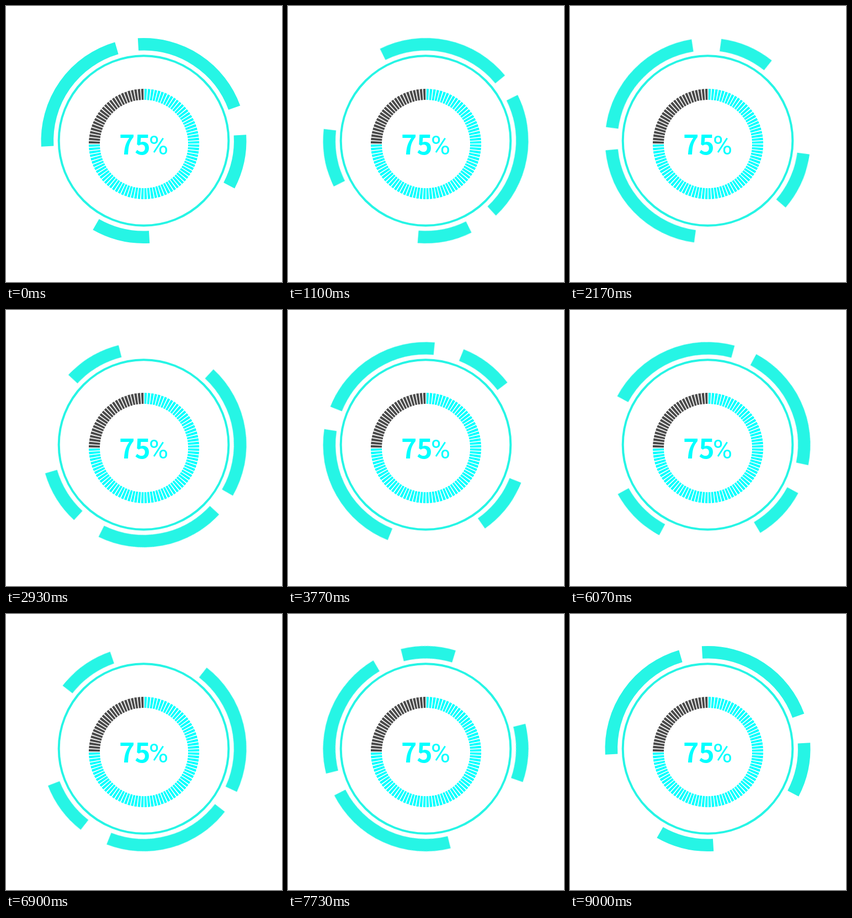
An HTML page for the animation above (9.03 s loop, 500 by 500 pixels).

```html
<!DOCTYPE html>
<html lang="en">
<head>
<meta charset="utf-8">
<title>Progress dial</title>
<style>
  html, body { margin: 0; width: 100%; height: 100%; overflow: hidden; background: #fff; }
  svg { display: block; width: 100vw; height: 100vh; }
  circle, path { fill: none; }
  .frame { stroke: #26f5e5; }
  .ticks { stroke-width: 20; stroke-dasharray: .7 .3; stroke-dashoffset: -.15; }
  .value { fill: #0ff; font: 700 48px "Noto Sans CJK SC", "Noto Sans CJK JP", "Noto Sans CJK", "Noto Sans", sans-serif; }
  .unit { font: 400 48px Roboto, Lato, sans-serif; }

  /* Paused: the script picks the moment so the motion keeps its 30 fps steps. */
  #ring {
    transform-origin: 249.5px 244px;
    animation: turn 9s infinite paused;
  }
  @keyframes turn {
    0% { transform: rotate(0deg); animation-timing-function: cubic-bezier(.521, 0, .683, 1); }
    45.556% { transform: rotate(670deg); animation-timing-function: cubic-bezier(.587, 0, .691, 1); }
    100% { transform: rotate(1080deg); }
  }
</style>
</head>
<body>
<svg viewBox="0 0 500 500">
  <g id="ring" class="frame" stroke-width="22.6"></g>
  <circle class="frame" cx="249.5" cy="244" r="153.8" stroke-width="4"/>
  <g id="dial"></g>
  <text class="value" x="205" y="268.5">75<tspan class="unit" x="258.8">%</tspan></text>
</svg>
<script>
  const LOOP = 9030;
  const ring = document.getElementById('ring');
  const dial = document.getElementById('dial');

  // Angles run clockwise from twelve o'clock.
  function addArc(parent, cx, cy, r, from, sweep, attrs = {}) {
    const point = deg => {
      const a = deg * Math.PI / 180;
      return `${cx + r * Math.sin(a)} ${cy - r * Math.cos(a)}`;
    };
    const path = document.createElementNS('http://www.w3.org/2000/svg', 'path');
    const large = sweep > 180 ? 1 : 0;
    path.setAttribute('d', `M${point(from)}A${r} ${r} 0 ${large} 1 ${point(from + sweep)}`);
    for (const key in attrs) path.setAttribute(key, attrs[key]);
    parent.append(path);
  }

  [73.3, 31, 33, 77].forEach((sweep, i) =>
    addArc(ring, 249.5, 244, 174.7, -3.3 + 90 * i, sweep));

  addArc(dial, 250, 250, 90, 0, 270, { class: 'ticks', stroke: '#0ff', pathLength: 75 });
  addArc(dial, 250, 250, 90, 270, 90, { class: 'ticks', stroke: '#4a4a4a', pathLength: 25 });

  function draw() {
    const step = Math.floor((performance.now() % LOOP + 5) * .03);
    ring.style.animationDelay = `${-step / 30}s`;
    requestAnimationFrame(draw);
  }
  draw();
</script>
</body>
</html>
```
